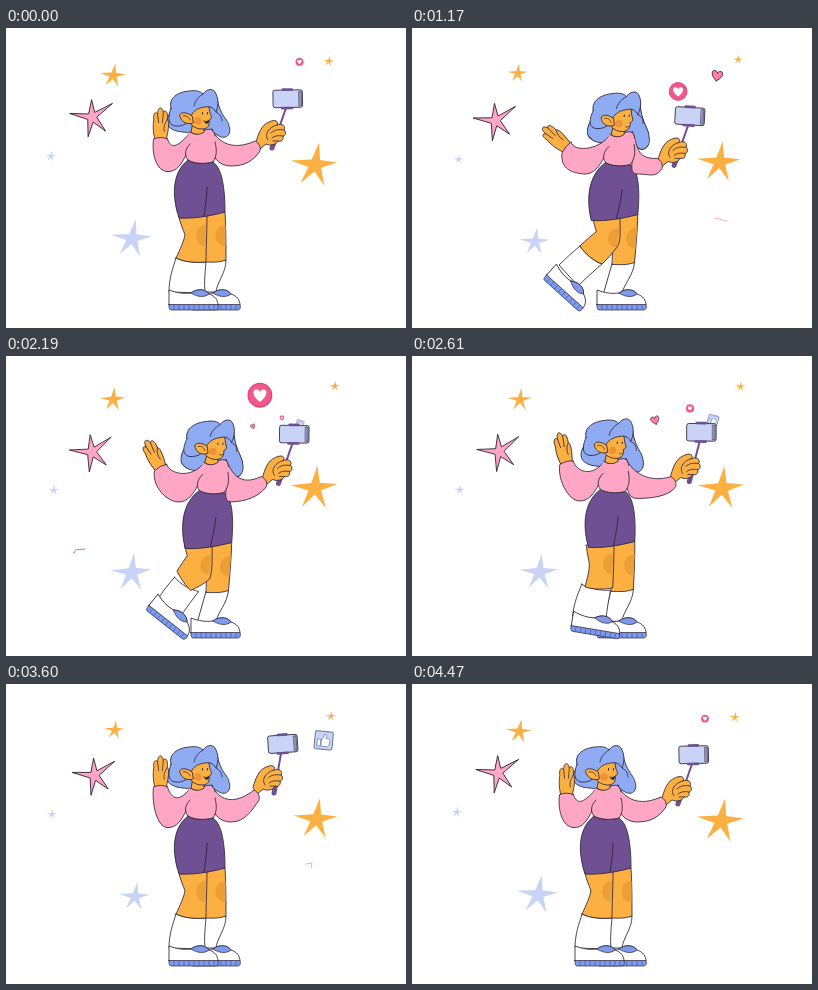
Animation, 400 px wide and 300 px high, one loop 4.5 s. Source, as an HTML page:

```html
<!DOCTYPE html>
<html lang="en">
<head>
<meta charset="utf-8">
<title>Selfie</title>
<style>
html, body { margin: 0; width: 100%; height: 100%; overflow: hidden; background: #fff; }
svg { display: block; width: 100vw; height: 100vh; }
</style>
</head>
<body>
<svg id="stage" viewBox="0 0 400 300"></svg>
<script>
const LOOP = 4500, STEP = 30;
const INK = '#2f2638', ORANGE = '#fdb042', TAN = '#eb9f35', PINK = '#ffa6c4', BLUE = '#8fabf3',
  PALE = '#c8d3f5', PURPLE = '#6f5092', SOLE = '#7c9aee', HOT = '#f4588a', SLATE = '#5f6c93';
const stage = document.getElementById('stage');
const updates = [];

function add(tag, attrs, parent = stage) {
  const el = document.createElementNS('http://www.w3.org/2000/svg', tag);
  for (const key in attrs) el.setAttribute(key, attrs[key]);
  return parent.appendChild(el);
}
const group = (parent = stage) => add('g', {}, parent);
const shape = (d, fill, parent, width = 0.85, stroke = INK) => add('path', {
  d, fill, stroke: width ? stroke : 'none', 'stroke-width': width,
  'stroke-linejoin': 'round', 'stroke-linecap': 'round'
}, parent);
const place = (el, x, y, r = 0, s = 1) =>
  el.setAttribute('transform', `translate(${x} ${y}) rotate(${r}) scale(${s})`);
const show = (el, on) => el.setAttribute('visibility', on ? 'visible' : 'hidden');

const lerp = (a, b, k) => a + (b - a) * k;
const clamp = v => Math.max(0, Math.min(1, v));
function ramp(t, from, to) {
  const u = clamp((t - from) / (to - from));
  return u * u * (3 - 2 * u);
}
const angle = t => 2 * Math.PI * t / LOOP;

// Blends the numbers of two paths that share one structure.
function mix(a, b, k) {
  const nums = b.match(/-?[\d.]+/g);
  let i = 0;
  return a.replace(/-?[\d.]+/g, n => lerp(+n, +nums[i++], k).toFixed(2));
}

// ---- stars ----
function starPath(tips, waist) {
  return 'M' + tips.map(([x, y], i) => {
    const [u, v] = tips[(i + 1) % tips.length];
    return `${x},${y} L${(x + u) * waist},${(y + v) * waist}`;
  }).join(' L') + 'Z';
}
const PLAIN = starPath([[2, -21], [21, -3], [10, 20], [-13, 19], [-24, -2]], 0.18);
const SHARP = starPath([[-1, -17], [20, -15], [15, 13], [-2, 20], [-22, -2]], 0.15);

function star(d, fill, x, y, size, { swayX = 0, swayY = 0, pulse = 0.04, lag = 0, line = 0 }) {
  const el = shape(d, fill, stage, line);
  updates.push(t => {
    const a = angle(t);
    place(el, x - swayX * Math.sin(a + lag), y + swayY * Math.cos(a),
      2 + 2 * Math.cos(a), size * (1 + pulse * Math.cos(2 * a)));
  });
}
star(PLAIN, ORANGE, 107.5, 45, 0.5, { swayX: 1.5, swayY: 2, pulse: 0.13 });
star(SHARP, PINK, 85.5, 92.5, 1, { swayX: 2.5, swayY: -3.5, pulse: 0, line: 0.9 });
star(PLAIN, PALE, 46.5, 131, 0.24, { swayX: 1.5, swayY: -3, lag: Math.PI / 2 });
star(PLAIN, PALE, 126.5, 213, 0.78, { swayX: 3, swayY: -3, pulse: 0.16 });
star(PLAIN, ORANGE, 309.5, 133.7, 1, { swayX: 1.5, swayY: 2.5 });
star(PLAIN, ORANGE, 326, 31.5, 0.24, { swayX: 3, swayY: 1.5, lag: Math.PI / 2 });

// ---- confetti strokes: drawn on, then wiped away ----
function streak(d, color, from, life = 480) {
  const el = shape(d, 'none', stage, 1, color);
  const len = el.getTotalLength();
  updates.push(t => {
    const u = (t - from) / life;
    const a = clamp(u * 2 - 1) * len, b = clamp(u * 2) * len;
    show(el, u > 0 && u < 1);
    el.setAttribute('stroke-dasharray', `0 ${a} ${Math.max(0.01, b - a)} ${len + 1}`);
  });
}
streak('M86,150 L88,142 L97,143', ORANGE, 450);
streak('M303,191 C306,188 308,193 315,193', PINK, 930);
streak('M68,197 C69,192 73,194 79,193', HOT, 1950);
streak('M247,174 L249,176 L257,170', PALE, 2750);
streak('M300,180 L306,179 L305,184', PINK, 3360);

// ---- hearts and badges: grow, drift along a line, shrink away ----
function floater(el, from, life, [x0, y0], [x1, y1], size, tilt = 0, grow = 1000) {
  updates.push(t => {
    const age = (t - from + LOOP) % LOOP;
    show(el, age < life);
    const u = age / life;
    place(el, lerp(x0, x1, u), lerp(y0, y1, u), tilt * (1 - u),
      size * lerp(0.38, 1, ramp(age, 0, grow)) * (1 - ramp(age, life - 250, life)));
  });
}
const HEART = 'M0,5 C-7,0 -6,-5 -3,-5 C-1,-5 0,-3.5 0,-2.5 C0,-3.5 1,-5 3,-5 C6,-5 7,0 0,5 Z';
const heart = () => shape(HEART, '#ff7fa9', stage, 0.8);
function like() {
  const g = group();
  add('circle', { r: 11, fill: HOT, stroke: '#d9477a', 'stroke-width': 1.2 }, g);
  add('path', { d: HEART, fill: '#fff', transform: 'scale(1.15) translate(0 .4)' }, g);
  return g;
}
function thumb() {
  const g = group();
  add('rect', { x: -9, y: -9, width: 18, height: 18, rx: 1.5, fill: PALE, stroke: SLATE, 'stroke-width': 0.9 }, g);
  shape('M-6,-1 H-3 V6 H-6 Z M-2,-1 C0,-2 0,-4 0,-6 C2,-7 3,-5 2,-2 H5 C7,-1 6,0 6,1 C6,4 5,6 4,6 H-2 Z', '#fff', g, 0.6, SLATE);
  return g;
}
floater(heart(), 560, 1200, [304, 53], [306, 43], 1, 20, 600);
floater(heart(), 2080, 1320, [248, 72], [236, 53], 1.1, -25);
floater(like(), 600, 2000, [273, 77], [249, 29.5], 1.07);
floater(like(), 2000, 1300, [275, 66], [281.5, 37], 0.45);
floater(like(), 3850, 1050, [283, 50], [300, 24], 0.42);
floater(thumb(), 2020, 2130, [291, 69], [327, 52], 1, 22, 1600);

// ---- motion ----
const sway = t => ramp(t, 50, 620) * (1 - ramp(t, 2100, 3200));
const stride = t => ramp(t, 50, 620) * (1 - ramp(t, 1850, 2850));
const tilt = t => -50 * ramp(t, 0, 1170) * (1 - ramp(t, 1170, 3400));
const reach = t => ramp(t, 2200, 3000) * (1 - ramp(t, 3650, 4450));

const PHONE_STOPS = [[0, 282, 71], [1100, 278, 88.5], [2500, 290, 77], [3650, 277, 60], [LOOP, 282, 71]];
function phoneAt(t) {
  const i = PHONE_STOPS.findIndex(stop => stop[0] > t);
  const [from, x0, y0] = PHONE_STOPS[i - 1], [to, x1, y1] = PHONE_STOPS[i];
  const k = ramp(t, from, to);
  return [lerp(x0, x1, k), lerp(y0, y1, k)];
}

// The body leans over the standing foot.
const SLANT = 0.09, PIVOT = 260, DROP = 2.5;
const lean = (x, y, k) => [x + SLANT * k * (PIVOT - y), y + DROP * k];
function bodyGroup() {
  const g = group();
  updates.push(t => {
    const k = sway(t);
    g.setAttribute('transform', `matrix(1 0 ${-SLANT * k} 1 ${SLANT * PIVOT * k} ${DROP * k})`);
  });
  return g;
}

// ---- figure ----
const mane = group(bodyGroup());
shape('M168,80 C160,88 158,97 166,101 C172,105 180,103 186,106 L210,106 C220,114 226,106 223,98 C222,91 214,88 211,70 Z', BLUE, mane);
updates.push(t => {
  const s = 1 + 0.2 * sway(t);
  mane.setAttribute('transform', `translate(0 ${62 * (1 - s)}) scale(1 ${s})`);
});

function shoe() {
  const g = group();
  shape('M0,-5 L0,-20 C8,-17 15,-16 22,-17 C28,-22 37,-21 40,-16 C46,-14 49,-10 49,-5 Z', '#fff', g);
  shape('M22,-17 C28,-22 37,-21 40,-16 C35,-12 28,-13 22,-17 Z', SOLE, g, 0.7);
  shape('M0,-5.5 H49 C50,-2 49,0 46,0 H2 C0,0 0,-3 0,-5.5 Z', SOLE, g, 0.7);
  let ribs = '';
  for (let x = 5; x < 48; x += 5) ribs += `M${x},-4.5 V-.5`;
  shape(ribs, 'none', g, 0.7, '#44599f');
  return g;
}

const backLeg = bodyGroup();
shape('M198,233 L220,232 C220,245 211,254 210,264 L192,264 Z', '#fff', backLeg);
shape('M196,187 L219,184 C220,200 220,216 220,232 C212,235 205,234 198,234 Z', ORANGE, backLeg);
shape('M219.5,197 C206,197 206,218 219.5,218 Z', TAN, backLeg, 0);
place(shoe(), 185, 282);

// Front leg: standing path, lifted path
function legPart(standing, lifted, fill, width) {
  const el = shape(standing, fill, stage, width);
  updates.push(t => el.setAttribute('d', mix(standing, lifted, stride(t))));
}
legPart('M170,230 C178,234 190,235 200,234 C199,245 198,255 199,265 L163,264 C163,250 167,240 170,230 Z',
  'M168,218 C174,227 182,233 190,236 C182,243 174,250 166,258 L147,237 C154,230 161,224 168,218 Z', '#fff');
const step = shoe();
updates.push(t => {
  const k = stride(t), lift = Math.sin(k * Math.PI / 2);
  place(step, 163 - 32 * k, 282 - 31 * lift, 42 * lift);
});
legPart('M173,189 L201,187 C201,205 200,220 200,234 C190,235 178,234 170,230 C174,222 178,212 179,207 C177,201 174,195 173,189 Z',
  'M181,190 L208,190 C208,205 209,213 205,219 C200,226 195,231 190,236 C182,233 174,227 168,218 C174,212 180,207 184,204 C183,199 182,195 181,190 Z', ORANGE);
legPart('M200,197 C187,197 187,218 199.6,218 Z', 'M207.6,200 C193,200 192,220 204.6,219 Z', TAN, 0);

const shorts = bodyGroup();
shape('M182,132 C188,136 200,136 207,134 C216,140 219,160 219,184 C205,188 187,191 173,190 C167,172 164,146 182,132 Z', PURPLE, shorts);
shape('M201,159 C201,170 199,180 198,188', 'none', shorts);

// Waving hand
const palm = group();
shape('M-5,4 C-8,-6 -8,-14 -7,-20 C-8,-27 -5,-29 -3,-26 C-3,-34 2,-34 3,-28 C6,-31 8,-27 7,-20 C10,-19 8,-6 5,4 Z', ORANGE, palm);
shape('M-3,-26 L-2,-17 M3,-28 L2,-17 M7,-20 C4,-16 3,-12 4,-8', 'none', palm, 0.8);
const wrist = t => [154.5, 111 + 8.5 * Math.sin(angle(t))];
updates.push(t => place(palm, ...wrist(t), tilt(t), 0.96));

// Phone on a stick
const rig = group();
const stick = shape('', 'none', rig, 2, PURPLE), grip = shape('', 'none', rig, 5, PURPLE);
const device = group(rig);
add('rect', { x: -15, y: -9, width: 29.5, height: 17.5, rx: 2, fill: PALE, stroke: INK, 'stroke-width': 0.85 }, device);
shape('M11,-7.5 H13.5 V7 H11 Z', '#8e93bd', device, 0.5);
shape('M-5,-9.5 H4 M-6,9 H4', 'none', device, 2.6, PURPLE);
const fist = group(rig);
shape('M-30,43 C-28,36 -25,26 -17,23 C-11,20 -7,22 -9,26 C-4,24 0,27 -2,31 C1,33 -1,37 -3,37 C-2,41 -5,43 -8,42 C-10,46 -16,47 -20,45 L-26,50 Z', ORANGE, fist);
shape('M-9,26 C-13,27 -16,29 -18,32 M-2,31 C-8,30 -12,31 -15,34 M-3,37 C-8,36 -12,37 -14,39 M-8,42 L-13,42 M-18,32 C-20,35 -20,38 -18,41', 'none', fist, 0.8);
updates.push(t => {
  const [x, y] = phoneAt(t), foot = -16 + 7 * reach(t);
  const along = u => `${lerp(-2, foot, u)},${lerp(9, 49, u)}`;
  place(rig, x, y);
  place(device, 0, 0, (y - 75) / 4);
  stick.setAttribute('d', `M${along(0)} L${along(1)}`);
  grip.setAttribute('d', `M${along(.72)} L${along(1)}`);
  place(fist, -2 + 2 * reach(t), 0);
});

// Sleeves follow the wrists
const farArm = shape('', PINK), nearArm = shape('', PINK);
updates.push(t => {
  const k = sway(t), r = reach(t);
  const [px, py] = phoneAt(t);
  const wx = px - 33 + 4 * r, wy = py + 42 + 4 * r;
  const [sx, sy] = lean(206, 101, k), [ax, ay] = lean(208, 127, k);
  const ex = 225, ey = 138 + 8 * k;
  farArm.setAttribute('d', `M${sx},${sy} C${sx + 6},${sy + 14} ${wx - 22},${ey - 15} ${wx},${wy}
    C${wx + 4},${wy + 2} ${wx + 6},${wy + 6} ${wx + 5},${wy + 10}
    C${wx - 2},${wy + 20} ${ex + 14},${ey} ${ex},${ey} C${ex - 8},${ey} ${ax + 1},${ay + 6} ${ax},${ay} Z`);

  const [x, y] = wrist(t), a = tilt(t) * Math.PI / 180;
  const cx = 7 * Math.cos(a), cy = 7 * Math.sin(a);
  const lx = x - cx, ly = y - cy, rx = x + cx, ry = y + cy;
  const [hx, hy] = lean(183, 106, k), [bx, by] = lean(161, 143.5, k), [qx, qy] = lean(180, 127, k);
  nearArm.setAttribute('d', `M${rx},${ry} C${rx + 3},${ry + 10} ${hx - 12},${hy + 14} ${hx},${hy} L${qx},${qy}
    C${qx - 4},${qy + 8} ${bx + 10},${by + 1} ${bx},${by}
    C${bx - 10},${by - 1} ${lx - 2},${ly + 17} ${lx},${ly} Q${x},${y - 3} ${rx},${ry} Z`);
});

const torso = bodyGroup();
shape('M184,104 C189,107 194,107 199,102 C205,100 208,102 209,108 C211,118 212,127 207,134 C199,136 189,136 182,132 C178,126 178,112 184,104 Z', PINK, torso, 0);
shape('M184,104 C189,107 194,107 199,102 C205,100 208,102 209,108 M184,116 C179,121 178,127 182,132 C189,136 199,136 207,134 C211,128 211,122 209,114', 'none', torso);

const head = bodyGroup();
shape('M187,94 L185,104 C189,107 194,107 198,104 L198,98 Z', ORANGE, head);
shape('M184,84 C190,77 200,76 203,79 L204,85 C206,89 206,91 203,92 C204,97 202,101 196,101 C190,101 186,98 184,95 Z', ORANGE, head);
shape('M165,80 C162,70 172,64 183,63 C190,62 194,63 197,66 C201,60 208,60 210,66 C213,72 212,79 210,84 C207,79 203,78 199,79 C192,80 189,82 186,86 C184,94 178,99 169,98 C160,96 163,86 165,80 Z', BLUE, head);
shape('M197,66 C192,69 189,73 188,78 M210,84 C214,86 216,89 216,93', 'none', head, 0.8);
shape('M186,88 C180,83 172,84 174,89 C176,94 181,97 187,95 Z', ORANGE, head);
shape('M177,88 C180,87 183,89 184,92', 'none', head, 0.7);
add('circle', { cx: 192, cy: 93, r: 3.8, fill: '#ee9338' }, head);
shape('M196.5,84.5 V86 M201.5,84.5 V86', 'none', head, 1);
const grin = shape('M198,93 C200,94 202,93 203,92 C203,96 200,97 198,93 Z', INK, head, 0.5);
const lips = shape('M199,96 C200,97 201,97 202,96', 'none', head, 0.8);
updates.push(t => {
  const smiling = sway(t) < 0.05;
  show(grin, smiling);
  show(lips, !smiling);
});

function draw(now) {
  const t = Math.floor((now % LOOP) / STEP) * STEP;
  for (const update of updates) update(t);
}
const start = performance.now();
function tick() {
  draw(Math.max(0, performance.now() - start));
  requestAnimationFrame(tick);
}
draw(0);
requestAnimationFrame(tick);
</script>
</body>
</html>
```
